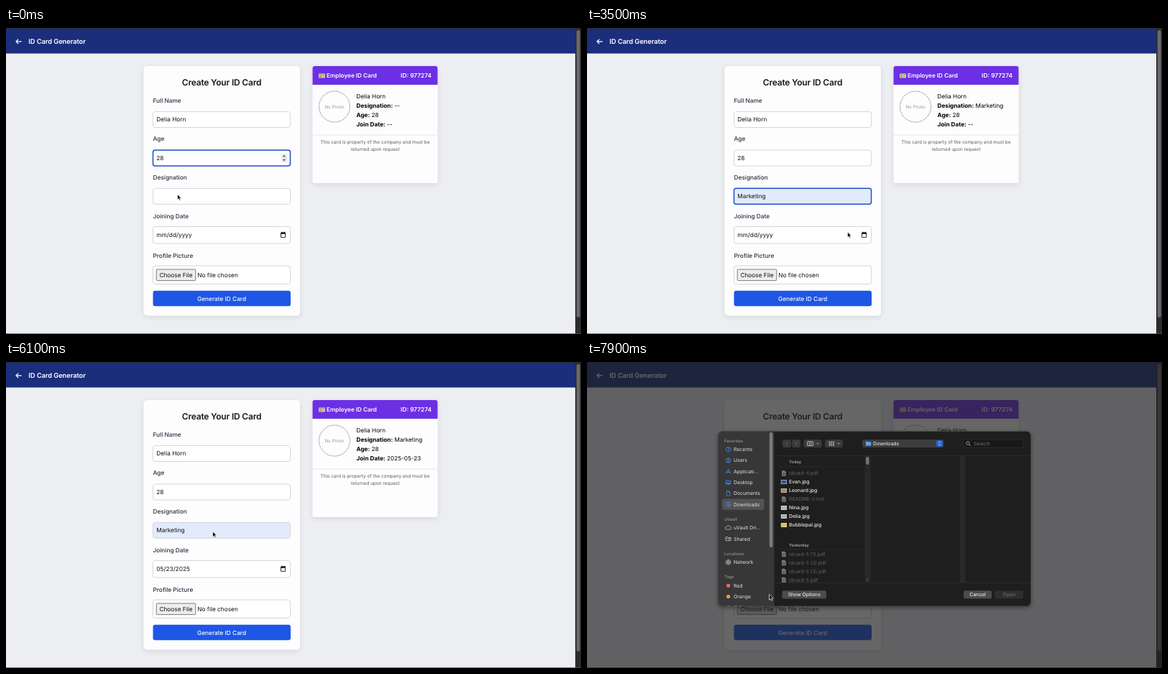
Animation, 800 px wide and 426 px high, one loop 8 s. Source, as an HTML page:

```html
<!DOCTYPE html>
<html lang="en">
<head>
<meta charset="utf-8">
<title>ID Card Generator</title>
<style>
  html, body { margin: 0; height: 100%; overflow: hidden; background: #edeef2; }
  svg { display: block; width: 800px; height: 426px; }
  text { font-family: Inter, Roboto, sans-serif; text-rendering: geometricPrecision; }
</style>
</head>
<body>
<svg id="stage" viewBox="0 0 800 426"></svg>
<script>
const LOOP = 8000, STEP = 100;
const FOCUS = 200, LIST_OPEN = 300, HOVER = 2300, PICK = 2800;
const CAL_OPEN = 4100, CAL_PICK = 5600, FILE_HOVER = 6600, DIALOG = 7300, LOCATIONS = 7600;
const PERSON = 'Delia Horn', DRIVE = 'uVault';

const clamp = v => Math.max(0, Math.min(1, v));
const ease = v => v * v * (3 - 2 * v);
const mix = (a, b, v) => a + (b - a) * v;

const rect = (x, y, w, h, fill, r = 0, more = '') =>
  `<rect x="${x}" y="${y}" width="${w}" height="${h}" rx="${r}" fill="${fill}" ${more}/>`;
const line = (d, color, width = 1, more = '') =>
  `<path d="${d}" fill="none" stroke="${color}" stroke-width="${width}" ${more}/>`;
const shape = (d, fill) => `<path d="${d}" fill="${fill}"/>`;
// y is the middle of the text line
const text = (x, y, s, size, fill = '#111', weight = 400, more = '') =>
  `<text x="${x}" y="${y + size * .36}" font-size="${size}" font-weight="${weight}" fill="${fill}" ${more}>${s}</text>`;
const MID = 'text-anchor="middle"', END = 'text-anchor="end"';

const defs = `<defs>
  <filter id="soft" x="-10%" y="-10%" width="120%" height="125%">
    <feDropShadow dx="0" dy="2" stdDeviation="3" flood-opacity=".1"/></filter>
  <filter id="deep" x="-20%" y="-20%" width="140%" height="140%">
    <feDropShadow dx="0" dy="2" stdDeviation="3" flood-opacity=".4"/></filter>
  <clipPath id="window"><rect x="182.5" y="96.5" width="435" height="243.5" rx="6"/></clipPath>
  <clipPath id="files"><rect x="261" y="131" width="126" height="176"/></clipPath>
</defs>`;

const pointerPath = [
  [0, 238.5, 231.5], [1900, 238.5, 231.5], [2500, 292, 280], [2900, 292, 280],
  [3100, 318, 282], [3300, 318, 282], [3500, 362.5, 284], [3800, 385, 287],
  [4300, 385, 287], [5000, 295.5, 217], [5900, 295.5, 217], [6700, 245, 338.5],
  [7700, 245, 338.5], [7900, 253.5, 323.5]
];

function pointer(t) {
  const i = pointerPath.findIndex(p => p[0] > t);
  const b = pointerPath[i < 0 ? pointerPath.length - 1 : i];
  const a = i < 0 ? b : pointerPath[i - 1];
  const v = i < 0 ? 0 : ease((t - a[0]) / (b[0] - a[0]));
  return `<path transform="translate(${mix(a[1], b[1], v)} ${mix(a[2], b[2], v)})"
    d="M0 0V7.6L1.7 6.1 2.9 8.8 4.2 8.2 3.1 5.6H5.5Z" fill="#000" stroke="#fff" stroke-width=".7"/>`;
}

function field(label, y, value, { focus, fill = '#fff', h = 22 } = {}) {
  const border = focus ? 'stroke="#1d4fc4" stroke-width="1.5"' : 'stroke="#cfd2d8" stroke-width=".9"';
  return text(204.5, y - 26.5, label, 8.3, '#2b3140', 500) +
    rect(204.5, y - h / 2, 191, h, fill, 3, border) + text(209.3, y, value, 8.3);
}

function form(t) {
  const typing = t >= FOCUS && t < HOVER;
  const filled = t >= HOVER;
  const caret = typing && Math.floor((t - FOCUS) / 500) % 2 === 0;
  const fileHover = t >= FILE_HOVER;
  return rect(191.5, 53, 217.5, 347.5, '#fdfdfe', 5, 'filter="url(#soft)"') +
    text(300, 76, 'Create Your ID Card', 12, '#15181f', 600, MID + ' letter-spacing="-.2"') +
    field('Full Name', 127.5, PERSON) +
    field('Age', 181, '28', { focus: t < FOCUS }) +
    (t < FOCUS ? rect(382.5, 175, 9, 12, '#ececee', 1) +
      shape('M385 179.3L387 176.8 389 179.3ZM385 182.8L387 185.3 389 182.8Z', '#444') : '') +
    field('Designation', 234.3, filled ? 'Marketing' : '',
      { focus: t >= FOCUS && t < CAL_OPEN, fill: filled ? '#e2ebfc' : '#fff' }) +
    (caret ? rect(209.3, 229.5, .7, 9.6, '#111') : '') +
    field('Joining Date', 288.2, t < CAL_PICK ? 'mm/dd/yyyy' : '05/23/2025', { h: 23.5 }) +
    rect(382.5, 285, 6.2, 6.6, 'none', .6, 'stroke="#111" stroke-width=".9"') +
    rect(382.5, 284.6, 6.2, 2.2, '#111') + line('M384 283.7V285M387.2 283.7V285', '#111', .9) +
    field('Profile Picture', 343.8, '', { h: 25.5 }) +
    rect(209.2, 336, 54.6, 15.6, fileHover ? '#d6d6d6' : '#ededed', 1, 'stroke="#6f6f6f" stroke-width=".9"') +
    text(236.5, 344, 'Choose File', 8.3, '#111', 400, MID) +
    text(266.3, 344, 'No file chosen', 8.3) +
    rect(204.5, 365.7, 191.5, 21.6, '#1e56e5', 3) +
    text(300, 376.7, 'Generate ID Card', 8.3, '#fff', 500, MID);
}

function card(t) {
  const rows = [
    ['', PERSON],
    ['Designation:', t < PICK ? '--' : 'Marketing'],
    ['Age:', '28'],
    ['Join Date:', t < CAL_PICK ? '--' : '2025-05-23']
  ];
  return rect(426.5, 53, 174, 163, '#fdfdfe', 3, 'filter="url(#soft)"') +
    shape('M426.5 79V56a3 3 0 0 1 3-3H597.5a3 3 0 0 1 3 3V79Z', '#6d2fe4') +
    rect(435, 63.2, 9, 6.2, '#d5cfb8', 1) + rect(435, 63.2, 9, 1.8, '#8fa87c', .8) +
    rect(436, 65.8, 2.4, 2.6, '#b08a4f') + line('M439.5 66.5H443M439.5 68H442', '#8b8b80', .6) +
    text(446, 66.2, 'Employee ID Card', 8.2, '#fff', 600) +
    text(592, 66.2, 'ID: 977274', 8.3, '#fff', 600, END) +
    '<circle cx="457" cy="109.5" r="21.5" fill="none" stroke="#85868c" stroke-dasharray="2.1 1.1"/>' +
    text(457, 109.7, 'No Photo', 6.2, '#9a9aa2', 400, MID) +
    rows.map(([k, v], i) => text(487.5, 94.7 + i * 13, `<tspan font-weight="700">${k}</tspan> ${v}`, 8.2, '#000')).join('') +
    line('M426.5 149H600.5', '#dfe1e6', .8) +
    text(513.5, 158.6, 'This card is property of the company and must be', 6.44, '#565b66', 400, MID) +
    text(513.5, 168.6, 'returned upon request', 6.44, '#565b66', 400, MID);
}

const page = t => rect(0, 0, 800, 426, '#edeef2') +
  rect(0, 0, 792, 35.5, '#1a2e7c') + rect(0, 0, 800, 1.4, '#262c3c') +
  line('M21.5 18.8H14.2M17.2 15.6L14 18.8 17.2 22', '#fff', 1.2) +
  text(31.3, 18.7, 'ID Card Generator', 9.4, '#fff', 600, 'letter-spacing="-.1"') +
  form(t) + card(t) +
  rect(792, 0, 8, 426, '#2c2c2e') + rect(793.8, 3, 4.8, 400, '#6a6a6c', 2.4) +
  rect(0, 425.2, 800, .8, '#55565a');

const suggestions = ['SWE', 'Marketing', 'Software Engineering', 'IT', 'Culinary'];
const dropdown = t =>
  `<g filter="url(#soft)">${rect(258.5, 250.5, 101.5, 102.5, '#161617', 4)}${shape('M265 251L269.7 246.3 274.4 251Z', '#161617')}</g>` +
  (t >= HOVER ? rect(258.5, 272.5, 101.5, 19.6, '#3b3b3d') : '') +
  suggestions.map((s, i) => text(265, 262.8 + i * 19.6, s, 7, '#e6e6e6', 500)).join('');

function calendar() {
  const col = i => 218.2 + i * 15.27, row = i => 155.7 + i * 15.35;
  let out = rect(204.5, 123.5, 119, 153, '#fff', 0, 'stroke="#9a9a9a" stroke-width=".7" filter="url(#deep)"') +
    text(211, 135.5, 'May 2025', 6, '#111', 600) + shape('M242 134.5H245.6L243.8 136.9Z', '#111') +
    line('M292.5 140.3V131.8M288.6 135.5L292.5 131.6 296.4 135.5M310 131.6V140.1M306.1 136.4L310 140.3 313.9 136.4', '#333', .8) +
    [...'SMTWTFS'].map((d, i) => text(col(i), row(0), d, 6, '#222', 400, MID)).join('');
  for (let i = 0; i < 42; i++) {
    const date = new Date(2025, 3, 27 + i), x = col(i % 7), y = row(1 + Math.floor(i / 7));
    const inMonth = date.getMonth() === 4, chosen = inMonth && date.getDate() === 23;
    if (chosen) out += rect(x - 7.6, y - 7.6, 15.2, 15.2, '#1a5fe0');
    out += text(x, y, date.getDate(), 6.1, chosen ? '#fff' : inMonth ? '#111' : '#777', 400, MID);
  }
  return out + text(216.8, 264.8, 'Clear', 6, '#1a66e0') + text(311.2, 264.8, 'Today', 6, '#1a66e0', 400, END);
}

// sidebar icons, drawn around 0,0
const circle = 'M-3.3 0a3.3 3.3 0 1 0 6.6 0a3.3 3.3 0 1 0-6.6 0';
const icons = {
  Recents: circle + 'M0-2V.2H1.6',
  Users: circle + 'M-1-.8a1 1 0 1 0 2 0a1 1 0 1 0-2 0M-2 2.3Q0 .3 2 2.3',
  'Applicati…': 'M0-3L-2.6 2.8M0-3L2.6 2.8M-3.3 1H3.3',
  Desktop: 'M-3.3-2.4H3.3V2H-3.3ZM-3.3 .6H3.3M-1.4 3.2H1.4',
  Documents: 'M-2.3-3.3H.6L2.4-1.5V3.3H-2.3ZM.5-3.2V-1.4H2.3',
  Downloads: circle + 'M0-1.8V1.7M-1.4 .4L0 1.8 1.4 .4',
  [DRIVE + ' Dri…']: 'M-2.4 2.3a1.8 1.8 0 0 1-.1-3.6a2.6 2.6 0 0 1 4.8-.3a2 2 0 0 1 .3 3.9Z',
  Shared: 'M-3.5 2.6V-2.6H-1L0-1.6H3.5V2.6ZM-3.5-.4H3.5M.3 1.2H2',
  Network: circle + 'M-3.3 0H3.3M0-3.3Q-2.8 0 0 3.3Q2.8 0 0-3.3'
};
const tags = { Red: '#ea6a5e', Orange: '#eb9a4b', Yellow: '#ecd15c', Green: '#69bd5f', Blue: '#4c8df0' };

function sidebar(active, withLocations) {
  const sections = [
    ['Favorites', ['Recents', 'Users', 'Applicati…', 'Desktop', 'Documents', 'Downloads']],
    [DRIVE, [DRIVE + ' Dri…', 'Shared']],
    ...(withLocations ? [['Locations', ['Network']]] : []),
    ['Tags', Object.keys(tags)]
  ];
  const ink = active ? '#e2e2e2' : '#959595';
  let y = 109.5, out = rect(182.5, 96, 78, 245, '#373738');
  for (const [title, items] of sections) {
    out += text(191, y, title, 5.8, '#8b8b8d', 600);
    y += 12.2;
    for (const item of items) {
      if (item === 'Downloads') out += rect(188, y - 7.6, 58.5, 15.2, '#535355', 3);
      const plain = item === 'Shared' || item.startsWith(DRIVE) || item === 'Network';
      const color = active ? (plain ? '#b9bcc2' : '#4b8df2') : plain ? '#85878c' : '#4064a0';
      out += tags[item]
        ? `<circle cx="196.6" cy="${y}" r="2.6" fill="${active ? tags[item] : item === 'Blue' ? '#4064a0' : '#8f8a80'}"/>`
        : line(icons[item], color, .8, `transform="translate(196.6 ${y})"`);
      out += text(204, y, item, 6.85, ink);
      y += 15.3;
    }
    y += 5.1;
  }
  return out + rect(253.8, 98, 4.6, 160, '#7b7b7c', 2.3);
}

const files = [
  ['idcard-4.pdf', 155], ['Evan.jpg', 167, '#3c4f8f'], ['Leonard.jpg', 179, '#a98468'], ['README-3.md', 191],
  ['Nina.jpg', 203, '#b9b4ac'], ['Delia.jpg', 215, '#a9adb0'], ['Bubblepal.jpg', 227, '#dcc14a'],
  ['idcard-5 (1).pdf', 267.5], ['idcard-5 (2).pdf', 279.5], ['idcard-5 (3).pdf', 291.5], ['idcard-5.pdf', 303.5]
];

function fileList() {
  const rows = files.map(([name, y, tone]) => (tone
    ? rect(269.8, y - 3, 8.2, 6, '#e4e4e4') + rect(270.3, y - 2.5, 7.2, 5, tone)
    : shape(`M271 ${y - 3.8}h3.8l2 2v5.6h-5.8Z`, '#77777a') + line(`M272.3 ${y}h3.2m-3.2 1.6h3.2`, '#3a3a3c', .7)) +
    text(281, y, name, 6.9, tone ? '#ebebeb' : '#636365', tone ? 500 : 400));
  return `<g clip-path="url(#files)">${text(281, 138.7, 'Today', 5.75, '#a5a5a7', 600)}
    ${line('M265 145.5H385M265 261H385', '#2d2d2e', .6)}
    ${text(281, 255.2, 'Yesterday', 5.75, '#a5a5a7', 600)}${rows.join('')}</g>`;
}

function dialog(t) {
  const active = t > DIALOG;
  const shift = mix(-3, 0, ease(clamp((t - DIALOG) / 200)));
  const strip = x => rect(x, 131, 8, 176, '#29292a');
  const button = (x, w, label, fill, ink) =>
    rect(x, 318.3, w, 11.2, fill, 2.6) + text(x + w / 2, 324, label, 6.8, ink, 500, MID);
  return `<g transform="translate(0 ${shift})">` +
    rect(182.5, 96.5, 435, 243.5, '#1e1e1e', 6, 'filter="url(#deep)"') +
    '<g clip-path="url(#window)">' + rect(260.5, 96, 358, 245, '#1e1e1e') + sidebar(active, t >= LOCATIONS) +
    rect(272, 108, 12, 11, '#3a3a3b', 2.5) + rect(285, 108, 12, 11, '#3a3a3b', 2.5) +
    line('M279 111.2L276.8 113.5 279 115.8M290 111.2L292.2 113.5 290 115.8', '#707072', .9) +
    rect(301.5, 108, 25.2, 11, '#3a3a3b', 2.5) + rect(331, 108, 25, 11, '#3a3a3b', 2.5) +
    rect(306.5, 110.8, 8, 5.6, 'none', .5, 'stroke="#d0d0d0" stroke-width=".8"') +
    line('M309.2 110.8V116.4M311.8 110.8V116.4M319.3 112.7L321 114.4 322.7 112.7M348.3 112.7L350 114.4 351.7 112.7', '#d0d0d0', .8) +
    line('M336.5 111.4H344M336.5 113.6H344M336.5 115.8H344', '#d0d0d0', 1.3, 'stroke-dasharray="2 .8"') +
    rect(383, 108, 113, 11, '#3d3d3f', 2.5) +
    shape('M387.8 110.4h3l.8 .9h3.6v5.2h-7.4Z', '#5aa5e8') + text(398, 113.4, 'Downloads', 6.8, '#e4e4e4', 500) +
    rect(486, 109, 9, 9, active ? '#2063dc' : '#454547', 2) +
    line('M488.8 112.6L490.5 110.9 492.2 112.6M488.8 114.4L490.5 116.1 492.2 114.4', '#eee', .8) +
    rect(523, 108, 84, 11, '#18181a', 2.5, 'stroke="#343436" stroke-width=".6"') +
    '<circle cx="530" cy="113" r="2.2" fill="none" stroke="#b5b5b7" stroke-width=".8"/>' +
    line('M531.6 114.7L533.8 116.9', '#b5b5b7', .9) + text(538, 113.5, 'Search', 6.8, '#757577') +
    line('M261 130.7H618M261 307.2H618', '#343435', .7) +
    fileList() + strip(386.5) + strip(518.8) +
    rect(388, 132, 4.4, 11, '#737375', 2.2) + line('M389 301V305M391 301V305', '#606062', .6) +
    button(271.5, 61.5, 'Show Options', '#4c4c4e', '#ececec') +
    button(524, 39, 'Cancel', '#4c4c4e', '#ececec') +
    button(567.5, 39.5, 'Open', '#2e2e30', '#6a6a6c') + '</g>' +
    rect(182.5, 96.5, 435, 243.5, 'none', 6, 'stroke="#4d4d4e" stroke-width=".7"') + '</g>';
}

function shade(t) {
  const v = clamp((t - DIALOG) / 300), tone = mix(20, 32, v);
  return rect(0, 0, 800, 426, `rgb(${tone},${tone},${tone})`, 0, `opacity="${mix(.5, .68, v)}"`);
}

const scene = t => defs + page(t) +
  (t >= LIST_OPEN && t < PICK ? dropdown(t) : '') +
  (t >= CAL_OPEN && t < CAL_PICK ? calendar() : '') +
  (t >= DIALOG ? shade(t) + dialog(t) : '') +
  pointer(t);

const stage = document.getElementById('stage');
let shown = -1;
function tick() {
  const t = Math.floor(performance.now() % LOOP / STEP) * STEP;
  if (t !== shown) stage.innerHTML = scene(shown = t);
  requestAnimationFrame(tick);
}
tick();
</script>
</body>
</html>
```
